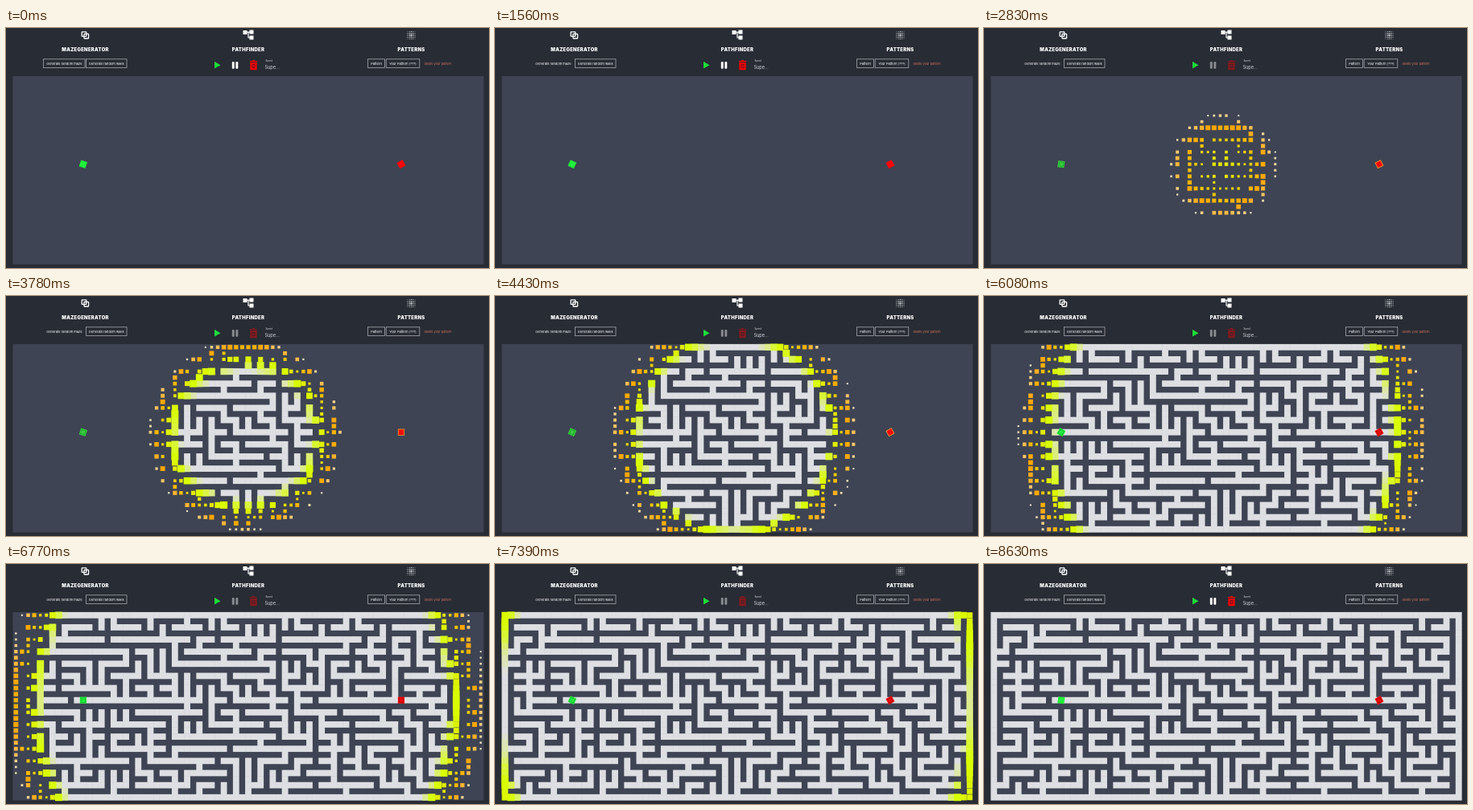
These frames come from a looping animation (600 by 299 pixels, 8.7 s). An HTML page with a canvas:

```html
<!DOCTYPE html>
<html lang="en">
<head>
<meta charset="utf-8">
<title>Maze generator</title>
<style>
  html, body { margin: 0; width: 100%; height: 100%; overflow: hidden; background: #282c34; }
  svg, canvas { position: absolute; left: 0; top: 0; width: 600px; height: 299px; }
  text { font-family: Inter, "Open Sans", sans-serif; fill: #fff; text-anchor: middle; }
  .title { font-size: 5.9px; font-weight: 900; letter-spacing: .3px; }
  .label { font-size: 4px; }
  .frame { fill: none; stroke: #b4b7bd; stroke-width: .7; }
</style>
</head>
<body>
<svg viewBox="0 0 600 299">
  <rect x="8.5" y="60" width="585" height="234.5" fill="#3e4453"/>

  <g fill="none" stroke="#fff" stroke-width="1.3">
    <rect x="94.2" y="4.8" width="5.6" height="5.6" rx=".5"/>
    <rect x="97" y="7.4" width="5.6" height="5.6" rx=".5"/>
  </g>
  <g fill="#fff">
    <path d="M294.5 3h5v5h-5zM302.5 2.5h5v5h-5zM302.5 9.5h5v5h-5z"/>
    <path d="M299 5.2h4M301 5.2v6.8h2" fill="none" stroke="#fff" stroke-width="1.2"/>
  </g>
  <g id="dots" fill="#fff"></g>

  <text class="title" x="98.5" y="29.2">MAZEGENERATOR</text>
  <text class="title" x="301" y="29.2">PATHFINDER</text>
  <text class="title" x="503.6" y="29.2">PATTERNS</text>

  <rect id="mazeFrame" class="frame" x="46.6" y="38.8" width="51.4" height="10.8"/>
  <rect class="frame" x="99.4" y="38.8" width="50.6" height="10.8"/>
  <rect class="frame" x="449.6" y="38.8" width="20.8" height="10.8"/>
  <rect class="frame" x="472.2" y="38.8" width="41.6" height="10.8"/>
  <text class="label" x="72.4" y="45.7">Generate random maze</text>
  <text class="label" x="124.7" y="45.7">Generate random walls</text>
  <text class="label" x="460" y="45.7">Pattern</text>
  <text class="label" x="493" y="45.7">Your Pattern (???)</text>
  <text class="label" x="536.5" y="45.7" style="fill:#d0705e;font-size:3.8px">delete your pattern</text>

  <path d="M259 41.8v8.8l7.5-4.4z" fill="#1fdc3a"/>
  <g id="controls">
    <rect x="280.8" y="42" width="2.9" height="8.8" rx="1" fill="#fff"/>
    <rect x="285.4" y="42" width="2.9" height="8.8" rx="1" fill="#fff"/>
    <path d="M302.8 40.9h2.7l.8-.8h2.4l.8.8h2.7v1.4h-9.4zM303.3 43h8.4v9.2h-8.4z" fill="#f00505"/>
    <path d="M306 45.6h3v3.6h-3z" fill="none" stroke="#60141a" stroke-width=".9"/>
  </g>
  <text x="326.7" y="41.6" style="font-size:2.8px;fill:#ddd">Speed</text>
  <text x="330.6" y="50.8" style="font-size:5.6px;fill:#d5d7db">Supe...</text>
</svg>
<canvas id="stage"></canvas>

<script>
const LOOP = 8700, COLS = 77, ROWS = 31;
const LEFT = 8.5, TOP = 60, CW = 585 / COLS, CH = 234.5 / ROWS;
const MARKER_ROW = 14, GREEN_COL = 11, RED_COL = 63;
const FIRST_WALL = 2370, WALL_DELAY = 3.6, STAGE_MS = 200;

// Each wall passes through these looks, one per stage
const LOOKS = [
  { scale: .25, rgb: [240, 234, 216] },
  { scale: .8, rgb: [255, 165, 0] },
  { scale: .36, rgb: [232, 220, 0] },
  { scale: 1.2, rgb: [216, 255, 0] },
  { scale: 1.03, rgb: [222, 223, 227] }
];

const $ = id => document.getElementById(id);
const mix = (a, b, k) => a + (b - a) * k;
const ramp = (t, from, to) => Math.min(1, Math.max(0, (t - from) / (to - from)));

const ratio = Math.max(2, window.devicePixelRatio || 1);
const canvas = $('stage');
canvas.width = 600 * ratio;
canvas.height = 299 * ratio;
const ctx = canvas.getContext('2d');
ctx.scale(ratio, ratio);

// Round dot grid: dots shrink away from the middle
for (let i = 0; i < 25; i++) {
  const dx = i % 5 - 2, dy = Math.floor(i / 5) - 2;
  const dot = document.createElementNS('http://www.w3.org/2000/svg', 'circle');
  dot.setAttribute('cx', 503.4 + dx * 2.3);
  dot.setAttribute('cy', 9 + dy * 2.3);
  dot.setAttribute('r', Math.max(0, .95 - .2 * Math.hypot(dx, dy)));
  $('dots').append(dot);
}

// Posts stand on even cells; each one topples onto a free neighbour cell
function buildMaze(seed) {
  const random = () => (seed = (seed * 1664525 + 1013904223) >>> 0) / 4294967296;
  const solid = Array.from({ length: ROWS }, (_, r) => Array.from({ length: COLS }, (_, c) =>
    r === 0 || c === 0 || r === ROWS - 1 || c === COLS - 1 || (r % 2 === 0 && c % 2 === 0)));

  for (let r = 2; r < ROWS - 1; r += 2) {
    for (let c = 2; c < COLS - 1; c += 2) {
      const ways = [[1, 0], [0, 1], [-1, 0]];
      if (r === 2) ways.push([0, -1]);
      const free = ways.filter(([dx, dy]) => !solid[r + dy][c + dx]);
      // A straight wall runs through both markers
      const offset = Math.abs(c - 38);
      const straight = r === MARKER_ROW && offset >= 12 && offset <= 28;
      const [dx, dy] = straight ? ways[0] : free[Math.floor(random() * free.length)];
      solid[r + dy][c + dx] = true;
    }
  }

  const walls = [];
  solid.forEach((row, r) => row.forEach((on, c) => {
    if (on) walls.push({ c, r, dist: Math.hypot(c - 37.5, r - 14.5) });
  }));
  return walls.sort((a, b) => a.dist - b.dist);
}
const walls = buildMaze(20);

function drawWalls(t) {
  walls.forEach(({ c, r }, i) => {
    const age = (t - FIRST_WALL - i * WALL_DELAY) / STAGE_MS;
    if (age < 0) return;
    const stage = Math.min(Math.floor(age), LOOKS.length - 2);
    const k = Math.min(1, age - stage);
    const a = LOOKS[stage], b = LOOKS[stage + 1];
    const scale = mix(a.scale, b.scale, k), w = CW * scale, h = CH * scale;
    ctx.fillStyle = `rgb(${a.rgb.map((v, j) => Math.round(mix(v, b.rgb[j], k)))})`;
    ctx.fillRect(LEFT + (c + .5) * CW - w / 2, TOP + (r + .5) * CH - h / 2, w, h);
  });
}

// Quick tilt, then rest, six times per loop
function tilt(t, shift) {
  const phase = (t / (LOOP / 6) + shift) % 1;
  return 30 * Math.sin(Math.PI * Math.min(1, phase / .7)) ** .3;
}

function drawMarker(col, angle, fill, border, ring) {
  ctx.save();
  ctx.translate(LEFT + (col + .5) * CW, TOP + (MARKER_ROW + .5) * CH);
  ctx.rotate(angle * Math.PI / 180);
  const square = (size, color) => {
    ctx.fillStyle = color;
    ctx.fillRect(-size / 2, -size / 2, size, size);
  };
  square(8.2, border);
  square(6.6, fill);
  if (ring) {
    ctx.strokeStyle = ring;
    ctx.lineWidth = .7;
    ctx.setLineDash([1.3, .8]);
    ctx.strokeRect(-2.6, -2.6, 5.2, 5.2);
  }
  ctx.restore();
}

function render(t) {
  const running = ramp(t, 2000, 2180) - ramp(t, 7400, 7600);
  $('controls').style.opacity = 1 - running * .55;
  $('mazeFrame').style.opacity = 1 - ramp(t, 1000, 1190);

  ctx.clearRect(0, 0, 600, 299);
  drawWalls(t);
  const busy = running > .5, searching = busy && t < 5000;
  const green = searching ? '#35cf3b' : '#20f03a', red = '#f40808';
  drawMarker(GREEN_COL, tilt(t, .05), green, green, busy && '#12802a');
  drawMarker(RED_COL, -tilt(t, .25), red, searching ? '#f5a030' : red, t > 5700 && '#7a0a0a');
}

function tick() {
  render(performance.now() % LOOP);
  requestAnimationFrame(tick);
}
tick();
</script>
</body>
</html>
```
